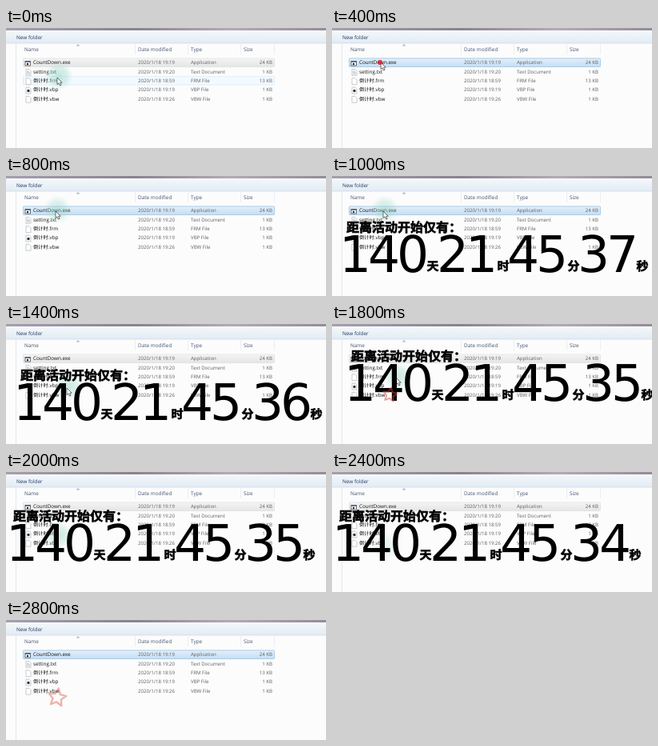
Animation, 400 px wide and 150 px high, one loop 3000 ms. Source, as an HTML page:

```html
<!DOCTYPE html>
<html lang="zh-CN">
<head>
<meta charset="utf-8">
<title>Countdown</title>
<style>
  html, body { margin: 0; width: 100%; height: 100%; overflow: hidden; background: #fcfcfc; }
  svg { display: block; width: 400px; height: 150px; }
  text { font: 6.1px "Open Sans", "Noto Sans", "Noto Sans CJK SC", sans-serif; text-rendering: geometricPrecision; }
  .head { font-size: 6.4px; fill: #445672; }
  .name { font-size: 6.3px; fill: #111; }
  .info { fill: #5e5e5e; }
  .size { text-anchor: end; }
  .zh { font: 900 16px "Noto Sans CJK SC", "Noto Sans CJK", sans-serif; stroke: #000; stroke-width: .6; }
  .unit { font-size: 15px; text-anchor: middle; }
  .digit { font: 63px "DejaVu Sans", sans-serif; text-anchor: middle; }

  .anim { animation: 3s step-end infinite; }
  #focused { animation-name: focused; }
  #hover { animation-name: hover; }
  #pointer { animation-name: pointer; }
  #arrow { animation-name: arrow; }
  #glow { animation-name: glow; }
  #dot { animation-name: dot; }
  #star { animation-name: star; }
  #overlay { animation-name: overlay; }
  .tick { animation-name: tick; animation-delay: calc(var(--i) * .4s - 2s); }

  @keyframes focused {
    0% { opacity: 0; }
    13.33% { opacity: 1; }
    46.66% { opacity: 0; }
    86.66%, 100% { opacity: 1; }
  }
  @keyframes hover {
    0% { opacity: 1; }
    6.66%, 100% { opacity: 0; }
  }
  @keyframes pointer {
    0% { transform: translate(64px, 62px); }
    6.66% { transform: translate(62px, 51px); }
    13.33% { transform: translate(61px, 43px); }
    26.66% { transform: translate(62px, 44px); }
    33.33% { transform: translate(64px, 44px); }
    40% { transform: translate(68px, 58px); }
    46.66% { transform: translate(76px, 80px); }
    53.33% { transform: translate(80px, 67px); }
    66.66% { transform: translate(64px, 81px); }
    73.33% { transform: translate(64px, 88px); }
    80%, 100% { transform: translate(64px, 95px); }
  }
  @keyframes arrow {
    0% { opacity: 1; }
    66.66%, 100% { opacity: 0; }
  }
  @keyframes glow {
    0% { opacity: .9; }
    13.33% { opacity: 0; }
    26.66% { opacity: .75; }
    80% { opacity: .4; }
    86.66%, 100% { opacity: 0; }
  }
  @keyframes dot {
    0% { opacity: 0; }
    13.33% { opacity: 1; }
    20%, 100% { opacity: 0; }
  }
  @keyframes star {
    0% { opacity: 0; transform: translate(60px, 43px); }
    20% { opacity: .6; transform: translate(60px, 43px) scale(.8); }
    26.66% { opacity: 0; }
    53.33% { opacity: 1; transform: translate(72.5px, 88.5px) scale(.5); }
    60% { opacity: .5; transform: translate(72.5px, 88.5px) scale(.8); }
    66.66% { opacity: 0; }
    86.66% { opacity: 1; transform: translate(64px, 97px) scale(.5); }
    93.33%, 100% { opacity: .4; transform: translate(64px, 97px); }
  }
  @keyframes overlay {
    0% { visibility: hidden; }
    33.33% { visibility: visible; transform: none; }
    53.33% { visibility: visible; transform: translate(6px, -23.5px); }
    66.66% { visibility: visible; transform: translate(-9px, -9px); }
    86.66%, 100% { visibility: hidden; }
  }
  @keyframes tick {
    0% { opacity: 1; }
    13.33%, 100% { opacity: 0; }
  }
</style>
</head>
<body>
<svg viewBox="0 0 400 150">
  <defs>
    <linearGradient id="frame">
      <stop offset="0" stop-color="#a79fae"/>
      <stop offset=".4" stop-color="#8b8390"/>
      <stop offset=".7" stop-color="#b5a9b4"/>
      <stop offset="1" stop-color="#958c99"/>
    </linearGradient>
    <linearGradient id="bar" x2="0" y2="1">
      <stop offset="0" stop-color="#f4f8fb"/>
      <stop offset="1" stop-color="#e2ebf4"/>
    </linearGradient>
    <linearGradient id="blue" x2="0" y2="1">
      <stop offset="0" stop-color="#e2effa"/>
      <stop offset="1" stop-color="#c6ddf2"/>
    </linearGradient>
    <linearGradient id="gray" x2="0" y2="1">
      <stop offset="0" stop-color="#f4f4f4"/>
      <stop offset="1" stop-color="#e4e5e5"/>
    </linearGradient>
    <radialGradient id="halo">
      <stop offset="0" stop-color="#93d3c4" stop-opacity=".65"/>
      <stop offset=".6" stop-color="#a9ddd0" stop-opacity=".45"/>
      <stop offset="1" stop-color="#c5ece2" stop-opacity="0"/>
    </radialGradient>
  </defs>

  <rect width="400" height="150" fill="#fcfcfc"/>
  <rect width="400" height="3" fill="url(#frame)"/>
  <rect y="3" width="400" height="16" fill="url(#bar)"/>
  <path d="M0 19H400" stroke="#cfd9e4" stroke-width=".7"/>
  <path d="M12.5 19V150" stroke="#dde4ec" stroke-width=".8"/>
  <path d="M161.5 20V33M227.5 20V33M293.5 20V33M335.5 20V33" stroke="#e4e9ee" stroke-width=".7"/>
  <path d="M87.5 22.5L90 20L92.5 22.5Z" fill="#a9bccd"/>
  <text x="13" y="14" class="head" style="fill:#223a60">New folder</text>
  <text class="head" x="23" y="29.3">Name</text>
  <text class="head" x="165" y="29.3">Date modified</text>
  <text class="head" x="231" y="29.3">Type</text>
  <text class="head" x="297" y="29.3">Size</text>

  <rect x="21.5" y="38" width="314" height="10.6" rx="1" fill="url(#gray)" stroke="#d9dadb" stroke-width=".6"/>
  <rect id="focused" class="anim" x="21.5" y="38" width="314" height="10.6" rx="1" fill="url(#blue)" stroke="#97c3e8" stroke-width=".7"/>
  <rect id="hover" class="anim" x="21.5" y="60.4" width="314" height="10.6" rx="1" fill="#f3f9fe" stroke="#cfe4f5" stroke-width=".6"/>
  <g id="files"></g>

  <g id="pointer" class="anim">
    <circle id="glow" class="anim" cx="2" cy="-2" r="18" fill="url(#halo)"/>
    <path id="arrow" class="anim" d="M0 0V8.6L2 6.8L3.5 10L5 9.3L3.6 6.2H6.2Z" fill="#fff" stroke="#333" stroke-width=".7"/>
  </g>

  <g id="overlay" class="anim">
    <text class="zh" x="18" y="69.7">距离活动开始仅有：</text>
    <text class="digit" y="119.5" x="29 65 101">140</text>
    <text class="digit" y="119.5" x="151 187">21</text>
    <text class="digit" y="119.5" x="239 275">45</text>
    <text class="digit" y="119.5" x="327">3</text>
    <g id="seconds"></g>
    <text class="zh unit" y="117.5" x="126 214 302 388">天时分秒</text>
  </g>

  <circle id="dot" class="anim" cx="60" cy="43" r="3" fill="#dc2f35"/>
  <path id="star" class="anim" fill="none" stroke="#d9473f" stroke-width="2.4" stroke-linejoin="round"/>
</svg>
<script>
  const find = id => document.getElementById(id);

  const page = '<path d="M25 -5.2H29L31 -3.2V2.6H25Z" fill="#fff" stroke="#a5a9ae" stroke-width=".6"/>';
  const icons = {
    exe: '<rect x="24" y="-3.8" width="6.6" height="5.4" fill="#fff" stroke="#333" stroke-width=".7"/><path d="M24 -3.2H30.6" stroke="#3b5f92" stroke-width="1.2"/><circle cx="27" cy="-.4" r="1.2" fill="#222"/>',
    txt: page + '<path d="M26 -2.6H29M26 -1H30M26 .6H30" stroke="#8c9caf" stroke-width=".6"/>',
    vbp: page + '<circle cx="28" cy="-.8" r="1.7" fill="#30343c"/>'
  };
  const files = [
    ['CountDown.exe', '19:19', 'Application', 24],
    ['setting.txt', '19:20', 'Text Document', 1],
    ['倒计时.frm', '18:59', 'FRM File', 13],
    ['倒计时.vbp', '19:19', 'VBP File', 1],
    ['倒计时.vbw', '19:26', 'VBW File', 1]
  ];
  find('files').innerHTML = files.map(([name, time, type, size], i) => `
    <g transform="translate(0 ${45.4 + i * 11.3})">
      ${icons[name.split('.')[1]] || page}
      <text class="name" x="34">${name}</text>
      <text class="info" x="165">2020/1/18 ${time}</text>
      <text class="info" x="231">${type}</text>
      <text class="info size" x="333">${size} KB</text>
    </g>`).join('');

  find('seconds').innerHTML = [7, 6, 5, 4].map((digit, i) =>
    `<text class="digit anim tick" style="--i:${i}" x="363" y="119.5">${digit}</text>`).join('');

  const corners = Array.from({ length: 10 }, (_, i) => {
    const radius = i % 2 ? 5.5 : 11.5, angle = i * Math.PI / 5 - Math.PI / 2 + .15;
    return [radius * Math.cos(angle), radius * Math.sin(angle)].map(v => v.toFixed(2)).join(' ');
  });
  find('star').setAttribute('d', `M${corners.join('L')}Z`);
</script>
</body>
</html>
```
